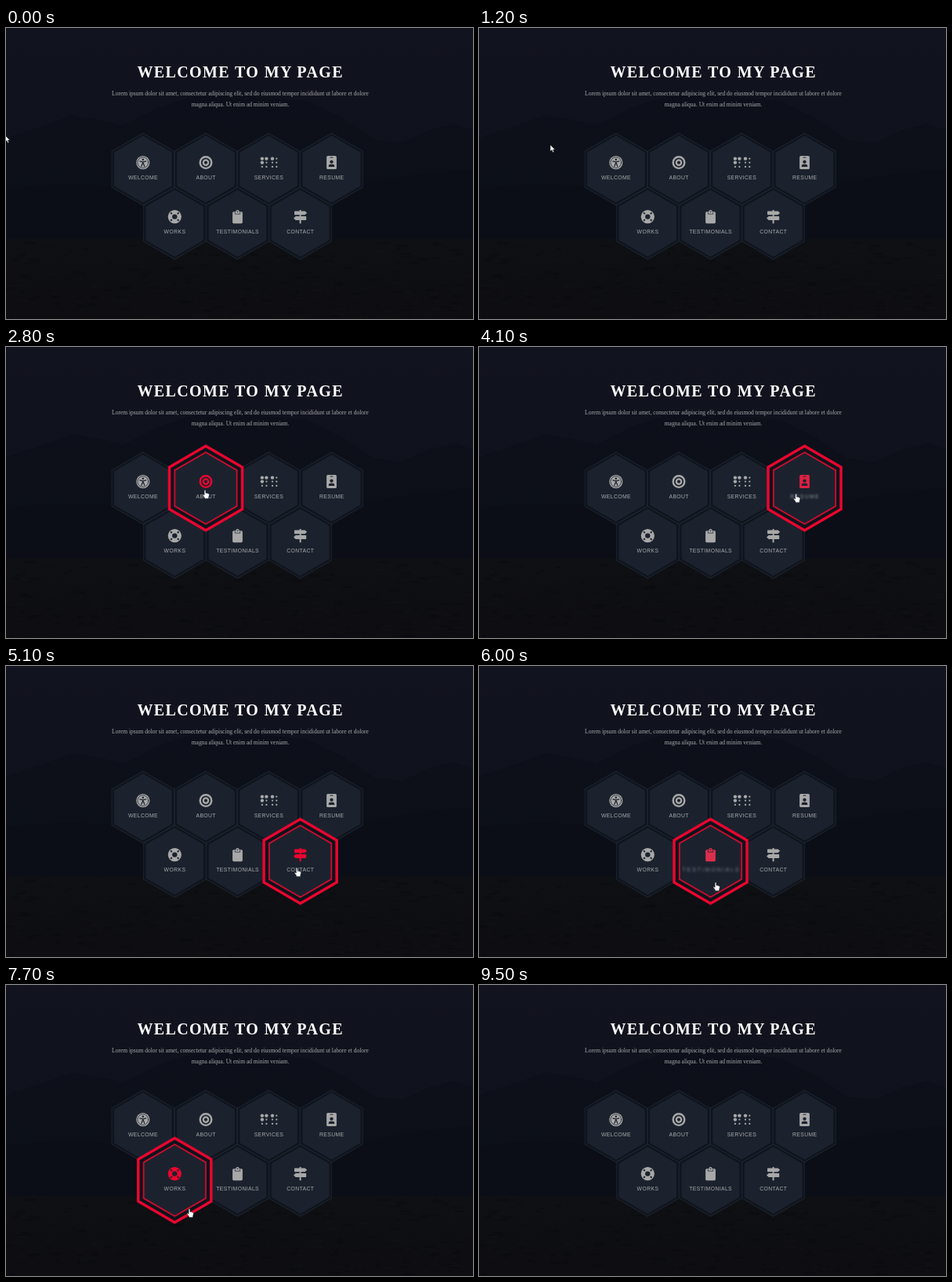
An HTML page for the animation above (9.6 s loop, 596 by 371 pixels).

```html
<!DOCTYPE html>
<html lang="en">
<head>
<meta charset="utf-8">
<title>Welcome</title>
<style>
html, body { margin: 0; width: 100%; height: 100%; overflow: hidden; background: #0d1018; }
svg { display: block; width: 596px; height: 371px; }
text { text-anchor: middle; }
.title { font: bold 20px "Liberation Serif", Times, serif; letter-spacing: 1.38px; fill: #fff; }
.intro { font: 7.5px "Liberation Serif", Times, serif; fill: #a9aaad; }
.label { font: 6.85px "Liberation Sans", Arial, sans-serif; fill: #a8a8a8; }
.icon { fill: currentColor; stroke: none; }
.icon .line { fill: none; stroke: currentColor; }
.icon .cut { fill: #1b222e; }
.icon .cutline { fill: none; stroke: #1b222e; stroke-linecap: round; }
</style>
</head>
<body>
<svg viewBox="0 0 596 371">
  <defs>
    <linearGradient id="sky" x1="0" y1="0" x2="0" y2="1">
      <stop offset="0" stop-color="#11131e"/>
      <stop offset="1" stop-color="#0e121b"/>
    </linearGradient>
    <linearGradient id="hill" x1="0" y1="0" x2="0" y2="1">
      <stop offset="0" stop-color="#0d101a"/>
      <stop offset="1" stop-color="#0b0f17"/>
    </linearGradient>
    <linearGradient id="field" x1="0" y1="0" x2="0" y2="1">
      <stop offset="0" stop-color="#0f1013"/>
      <stop offset="1" stop-color="#0d0d12"/>
    </linearGradient>
  </defs>
  <rect width="596" height="271" fill="url(#sky)"/>
  <path d="M0 140L40 127L85 111L120 117L150 124L195 101L235 88L300 86L385 93L430 115L470 142L505 146L540 130L572 122L596 130V271H0Z" fill="url(#hill)"/>
  <path d="M0 205Q110 190 200 215T400 212T596 180V271H0Z" fill="#0b0e16"/>
  <rect y="269" width="596" height="102" fill="url(#field)"/>
  <g id="grass"></g>
  <text class="title" x="299.2" y="62.6">WELCOME TO MY PAGE</text>
  <text class="intro" x="299" y="86">Lorem ipsum dolor sit amet, consectetur adipiscing elit, sed do eiusmod tempor incididunt ut labore et dolore</text>
  <text class="intro" x="299" y="100">magna aliqua. Ut enim ad minim veniam.</text>
  <g id="menu"></g>
  <g id="pointer" stroke="#11141c" stroke-width=".5" fill="#fff">
    <path id="arrow" d="M0 0V8.3L1.9 6.6L3.3 9.5L4.7 8.9L3.4 6H6Z"/>
    <path id="hand" d="M-.9 .8Q0 -.5 .9 .8V4.2L2 4.1L3.2 4.6L4.4 4.9Q5.5 5.3 5.4 6.5L4.6 9.4V11.2H-.6V10L-2.8 7.1Q-3.4 5.8 -2.3 5.8L-.9 6.9Z"/>
  </g>
</svg>
<script>
const LOOP = 9600, STEP = 100, ENTER = 500;
const $ = id => document.getElementById(id);
const clamp = v => Math.max(0, Math.min(1, v));
const mix = (a, b, p) => a + (b - a) * p;
const blend = (a, b, p) => `rgb(${a.map((v, i) => Math.round(mix(v, b[i], p)))})`;

function make(tag, attrs, parent) {
  const node = document.createElementNS('http://www.w3.org/2000/svg', tag);
  set(node, attrs);
  return parent.appendChild(node);
}
function set(node, attrs) {
  for (const k in attrs) node.setAttribute(k, attrs[k]);
}
const hexPoints = r => [0, 1, 2, 3, 4, 5].map(i => {
  const a = (i * 60 - 90) * Math.PI / 180;
  return `${(r * Math.cos(a)).toFixed(2)},${(r * Math.sin(a)).toFixed(2)}`;
}).join(' ');

// Faint seeded texture in the field
let seed = 7;
const rand = () => (seed = seed * 16807 % 2147483647) / 2147483647;
for (let i = 0; i < 260; i++) {
  make('ellipse', {
    cx: rand() * 596, cy: 274 + rand() * 95, rx: 2 + rand() * 7, ry: .5 + rand() * 1.5,
    fill: rand() < .6 ? '#090b10' : '#131316', opacity: .45
  }, $('grass'));
}

const dot = (x, y, r, c = '') => `<circle cx="${x}" cy="${y}" r="${r}" class="${c}"/>`;
const ring = (r, w, c = 'line') => `<circle r="${r}" stroke-width="${w}" class="${c}"/>`;
const box = (x, y, w, h, r, c = '') =>
  `<rect x="${x}" y="${y}" width="${w}" height="${h}" rx="${r}" class="${c}"/>`;
const stroke = (d, w) => `<path d="${d}" stroke-width="${w}" class="cutline"/>`;

const braille = [-8.3, -2.8, 4.8, 10.1].map((x, i) => [-5, 0, 5.3].map((y, j) =>
  dot(x, y, j === 0 && i < 3 || i === 0 && j === 1 ? 2.2 : 1.15)).join('')).join('');

const icons = {
  welcome: dot(0, 0, 8.6) + ring(6.9, .8, 'cutline') + dot(0, -3.8, 1.3, 'cut') +
    stroke('M-3.9 -1.7L-1 -1H1L3.9 -1.7M0 -.8V1.2M-.6 1L-1.9 4.8M.6 1L1.9 4.8', 1.3),
  about: ring(7.3, 2.4) + ring(3.2, 2.3),
  services: braille,
  resume: box(-6.4, -8.5, 12.8, 17, 1.7) + box(-2, -7.1, 4, 1.1, .5, 'cut') + dot(0, -1, 2.2, 'cut') +
    '<path d="M-3.8 5.4Q-3.8 2.2 -1.5 2.2H1.5Q3.8 2.2 3.8 5.4Z" class="cut"/>',
  works: dot(0, 0, 8.6) + dot(0, 0, 3.2, 'cut') +
    '<path d="M3.5 -3.5L5.2 -5.2M3.5 3.5L5.2 5.2M-3.5 3.5L-5.2 5.2M-3.5 -3.5L-5.2 -5.2" stroke-width="2" class="cutline" style="stroke-linecap:butt"/>',
  testimonials: box(-6.4, -6.4, 12.8, 15, 1.6) + dot(0, -6.3, 2.2) + dot(0, -6.3, .8, 'cut') +
    stroke('M-3.2 -5.2V-3.4H3.2V-5.2', .7),
  contact: box(-1, -8.6, 2, 2.5, .5) + box(-1, -2.5, 2, 3, 0) + box(-1, 4, 2, 4.6, .5) +
    '<path d="M-7 -7.2H5.9L8.6 -4.8L5.9 -2.3H-7Q-7.6 -2.3 -7.6 -3V-6.5Q-7.6 -7.2 -7 -7.2ZM7 -.6H-5.9L-8.6 1.8L-5.9 4.3H7Q7.6 4.3 7.6 3.6V.1Q7.6 -.6 7 -.6Z"/>'
};

// name, centre, hover start and end
const items = [
  ['welcome', 174.8, 180, 1500, 2150],
  ['about', 255, 180, 2150, 3050],
  ['services', 335.2, 180, 3050, 3800],
  ['resume', 415.5, 180, 3800, 4600],
  ['works', 215.3, 249, 6500, 7900],
  ['testimonials', 295.5, 249, 5750, 6500],
  ['contact', 375.6, 249, 4600, 5750]
].map(([name, x, y, from, to]) => {
  const group = make('g', { transform: `translate(${x} ${y})` }, $('menu'));
  const outer = make('polygon', { fill: '#0f131b' }, group);
  const inner = make('polygon', { fill: '#1b222e' }, group);
  const icon = make('g', { class: 'icon', transform: 'translate(0 -8.4)' }, group);
  icon.innerHTML = icons[name];
  const label = make('text', { class: 'label', y: 13.4 }, group);
  label.textContent = name.toUpperCase();
  return { group, outer, inner, icon, label, from, to };
});

const GREY = [168, 168, 168], RED = [233, 6, 47], EDGE = [27, 35, 47], FILL = [27, 34, 46];

function drawItem(it, t) {
  const on = t >= it.from && t < it.to;
  const grow = on ? clamp((t - it.from + 100) / 200) : t < it.from ? 0 : clamp(1 - (t - it.to + 50) / 150);
  const p = on ? 1 - (1 - clamp((t - it.from) / ENTER)) ** 2 : 1;
  it.level = on ? 2 : grow;

  set(it.outer, {
    points: hexPoints(mix(45.8, 53.7, grow)),
    stroke: blend(EDGE, RED, grow), 'stroke-width': mix(1.1, 3.5, grow)
  });
  set(it.inner, {
    points: hexPoints(mix(42.4, 45.8, grow)),
    stroke: blend(FILL, [205, 12, 46], grow), 'stroke-width': mix(.6, 1.8, grow)
  });
  it.icon.style.color = blend(GREY, RED, on ? p : grow);

  // Label contracts into focus
  const gap = mix(6.85, .38, p);
  it.label.style.letterSpacing = gap + 'px';
  it.label.style.opacity = p;
  it.label.style.filter = p < 1 ? `blur(${6 * (1 - p)}px)` : 'none';
  it.label.setAttribute('x', gap / 2);
}

const path = [
  [0, -1, 137], [500, 3, 140], [1000, 52, 147], [1200, 91, 149], [1600, 143, 165],
  [2100, 210, 180], [2800, 254, 182], [3300, 325, 183], [3800, 384, 186], [4100, 404.5, 187],
  [4500, 407, 210], [4800, 385, 250], [5300, 362, 262], [5700, 328, 272], [6000, 302, 275.5],
  [6500, 254, 278], [7000, 230, 278], [7700, 234, 285], [8000, 236, 298], [8900, 238, 338]
];

function drawPointer(t) {
  const i = path.findIndex(k => k[0] > t);
  $('pointer').style.display = i < 0 ? 'none' : '';
  if (i < 0) return;
  const [a, b] = [path[i - 1], path[i]];
  const p = (t - a[0]) / (b[0] - a[0]);
  $('pointer').setAttribute('transform', `translate(${mix(a[1], b[1], p)} ${mix(a[2], b[2], p)})`);
  const over = items.some(it => t >= it.from && t < it.to);
  $('hand').style.display = over ? '' : 'none';
  $('arrow').style.display = over ? 'none' : '';
}

let last = -1;
function frame() {
  const t = Math.floor(performance.now() % LOOP / STEP) * STEP;
  if (t !== last) {
    last = t;
    items.forEach(it => drawItem(it, t));
    [...items].sort((a, b) => a.level - b.level).forEach(it => $('menu').appendChild(it.group));
    drawPointer(t);
  }
  requestAnimationFrame(frame);
}
frame();
</script>
</body>
</html>
```
